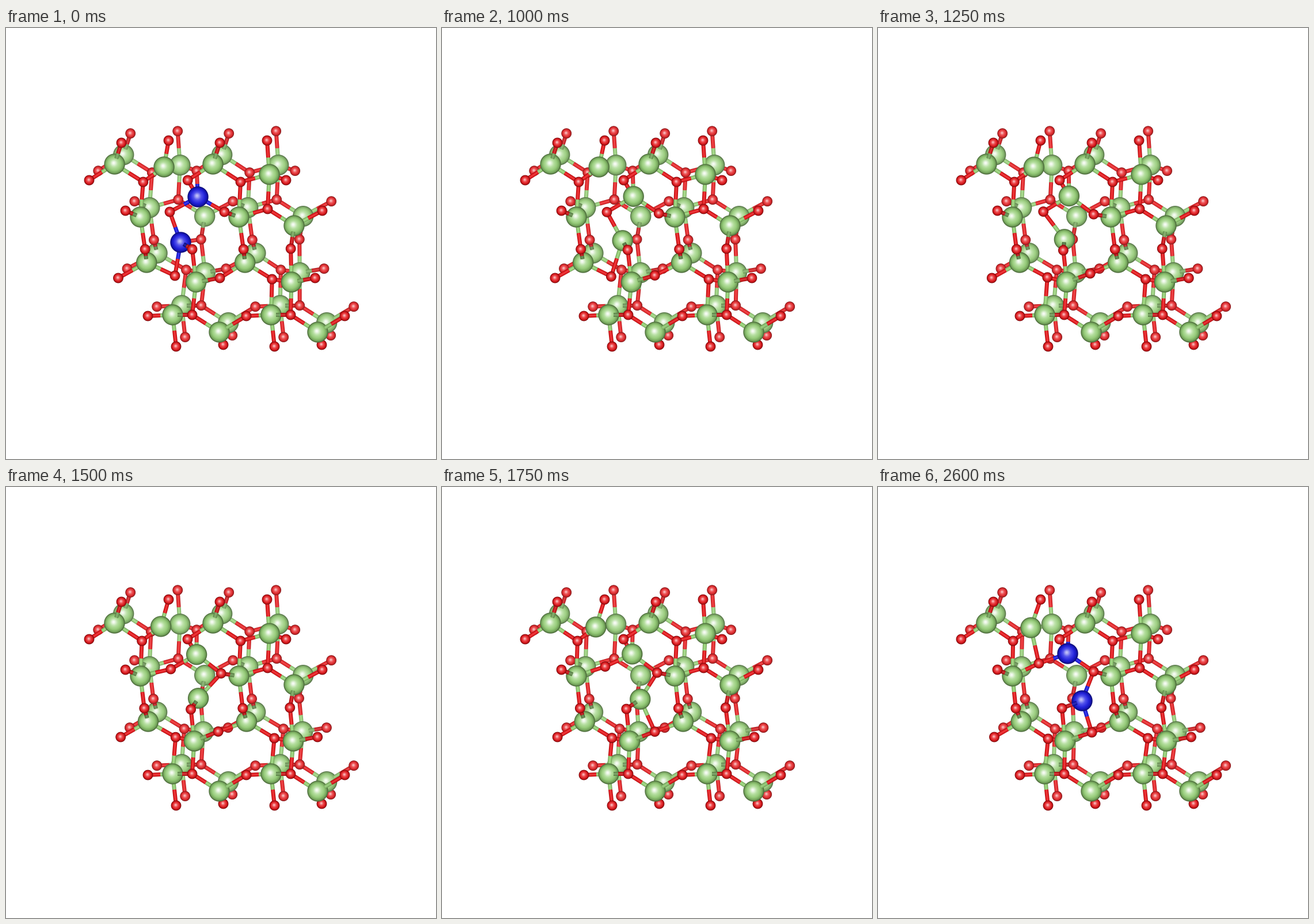
A matplotlib script for the animation above (3000 ms loop, 747 by 749 pixels).

```python
import numpy as np
import matplotlib.pyplot as plt
from matplotlib.animation import FuncAnimation
from matplotlib.collections import PolyCollection

W, H, DPI = 747, 749, 100
POSES = 6
CELL = np.array([171, 0])        # step to the next unit cell
LAYER = np.array([15.7, -16.3])  # step from the front layer to the back one
LENGTH = 62.0                    # bond length before projection
REACH = 66.2                     # longest projected bond

# one unit cell, repeated along CELL and LAYER
SILICON = {
    "a": (188, 236), "b": (286, 254), "e": (233, 328), "g": (329, 343),
    "h": (246, 407), "j": (327, 441), "l": (289, 498), "n": (370, 528),
}
OXYGEN = {
    "p": (144, 264), "q": (200, 199), "r": (236, 267), "s": (282, 195),
    "t": (207, 317), "u": (283, 314), "v": (240, 384), "w": (322, 383),
    "x": (198, 434), "y": (294, 436), "k": (246, 500), "m": (323, 498),
    "o": (295, 553), "z": (377, 550),
}
# a capital letter means the oxygen of the next cell
BONDS = {"a": "pqr", "b": "Prsu", "e": "rtuv", "g": "Tuw",
         "h": "vxy", "j": "Xwym", "l": "kmoy", "n": "Kmz"}
RAISED = {"aq", "et", "gw", "hv", "jX", "lm", "nK", "iw"}  # lean to the viewer

# reacting atoms in the front layer: start, end, sideways bend
TRACKS = {
    ("g", 0): ((333, 293), (329, 289), (0, 0)),
    ("i", 0): ((303, 372), (354, 371), (0, -5)),
    ("b", 0): ((274, 241), (265, 244), (0, -1)),
    ("u", 0): ((284, 319), (279, 306), (5, 5)),
    ("t", 1): ((379, 319), (374, 320), (-3, 4)),
    ("x", 1): ((371, 434), (371, 426), (-3, -5)),
    ("y", 0): ((293, 430), (295, 437), (0, 0)),
    ("w", 0): ((323, 384), (319, 384), (0, 2)),
}
# first pose of the bonds that open late beside the reacting atoms
OPENING = {"eu": 3, "jy": 2, "bP": POSES}

GREEN = np.array([148, 208, 116]) / 255
BLUE = np.array([26, 26, 228]) / 255
RED = np.array([232, 22, 26]) / 255

TURN = np.linspace(0, 2 * np.pi, 44, endpoint=False)
RING = np.column_stack([np.cos(TURN), np.sin(TURN)])


def bell(v):
    return np.exp(-v * v)


def drift(x, y):
    """Sideways relaxation of the lattice over the whole run."""
    belt = 8 * bell((y - 425) / 25) * (1 - 2 * bell((x - 325) / 40))
    corner = 4 * bell((x - 245) / 45) * bell((y - 262) / 25)
    return belt - 3 * bell((y - 380) / 14) - corner


def places_at(t):
    places = {}
    for name, xy in {**SILICON, **OXYGEN}.items():
        for cell in range(3 if name in "ptxk" else 2):
            for layer in range(2):
                spot = np.array(xy) + cell * CELL + layer * LAYER
                spot[0] += (t - 0.5) * drift(*spot)
                places[name, cell, layer] = spot
    for key, track in TRACKS.items():
        start, end, bend = map(np.array, track)
        places[(*key, 0)] = start + (end - start) * t + bend * np.sin(np.pi * t)
    return places


def bonds_at(pose, places):
    pairs = []
    for name, cell, layer in places:
        defect = cell == layer == 0
        links = "uTXyw" if name == "i" else BONDS.get(name, "")
        if name == "g" and defect:
            links += "P"
        for o in links:
            if defect and pose < OPENING.get(name + o, 0):
                continue
            pairs.append(((name, cell, layer), (o.lower(), cell + o.isupper(), layer),
                          name + o in RAISED))
    pairs.append((("g", 0, 0), ("p", 1, 1), False))
    pairs.append((("i", 0, 0), ("w", 0, 1), False))
    return [b for b in pairs if np.hypot(*(places[b[0]] - places[b[1]])) < REACH]


def base_color(key, pose):
    if key[0] in OXYGEN:
        return RED
    reacting = key in (("g", 0, 0), ("i", 0, 0))
    return BLUE if reacting and pose in (0, POSES - 1) else GREEN


def haze(color, layer):
    fog = 0.07 * layer
    return np.clip(color * (1 - fog) + fog, 0, 1)


def sphere(center, radius, color, layer):
    gloss = 1.0 if color is GREEN else 0.78
    stops = [0, 0.14, 0.4, 0.7, 0.9, 1]
    for f in np.linspace(1, 0.06, 16):
        white = gloss * np.interp(f, stops, [1, 0.85, 0.32, 0.06, 0, 0])
        dark = np.interp(f, stops, [1, 1, 1, 0.95, 0.77, 0.52])
        tone = color * dark * (1 - white) + white
        shift = np.array([-0.1, -0.12]) * radius * (1 - f)
        yield center + shift + RING * radius * f, haze(tone, layer)


def stick(p, q, color, shade, layer):
    along = q - p
    side = np.array([-along[1], along[0]]) / max(np.hypot(*along), 1e-6)
    for half, tone, white in ((3.5, 0.78, 0), (2.6, 0.96, 0.02), (1.2, 1, 0.14)):
        w = side * half
        fill = (color * tone * (1 - white) + white) * shade
        yield np.array([p + w, q + w, q - w, p - w]), haze(fill, layer)


def build(pose):
    places = places_at(pose / (POSES - 1))
    bonds = bonds_at(pose, places)
    lifted = {o for _, o, raised in bonds if raised}
    depth, parts = {}, []
    for key, xy in places.items():
        oxygen = key[0] in OXYGEN
        depth[key] = -100 * key[2] + oxygen * (2 if key in lifted else -1)
        ball = sphere(xy, 8.9 if oxygen else 18.2, base_color(key, pose), key[2])
        parts.append((depth[key], ball))

    for s, o, raised in bonds:
        p, q = places[s], places[o]
        mid, shade = (p + q) / 2, 1.0
        z = min(depth[s], depth[o]) - 0.5
        if raised:
            shade = 0.45 + 0.55 * min(np.hypot(*(q - p)) / LENGTH, 1)
            z = depth[s] + 1
            p = p + (q - p) * 0.26
        parts.append((z, stick(p, mid, base_color(s, pose), shade, s[2])))
        parts.append((z, stick(mid, q, RED, (1 + shade) / 2, o[2])))

    parts.sort(key=lambda part: part[0])
    shapes = [piece for _, part in parts for piece in part]
    return PolyCollection([s for s, _ in shapes], facecolors=[c for _, c in shapes],
                          edgecolors="none", linewidths=0)


fig = plt.figure(figsize=(W / DPI, H / DPI), dpi=DPI, facecolor="white")
ax = fig.add_axes([0, 0, 1, 1])
ax.set_xlim(-0.5, W - 0.5)
ax.set_ylim(H - 0.5, -0.5)
ax.axis("off")

poses = [ax.add_collection(build(k), autolim=False) for k in range(POSES)]


def show(step):
    # the first and last pose rest for a second, the others a quarter
    current = min(max(step - 3, 0), POSES - 1)
    for k, pose in enumerate(poses):
        pose.set_visible(k == current)
    return poses


anim = FuncAnimation(fig, show, frames=12, init_func=lambda: show(0),
                     interval=250, repeat=True, repeat_delay=0, blit=False)
plt.show()
```
